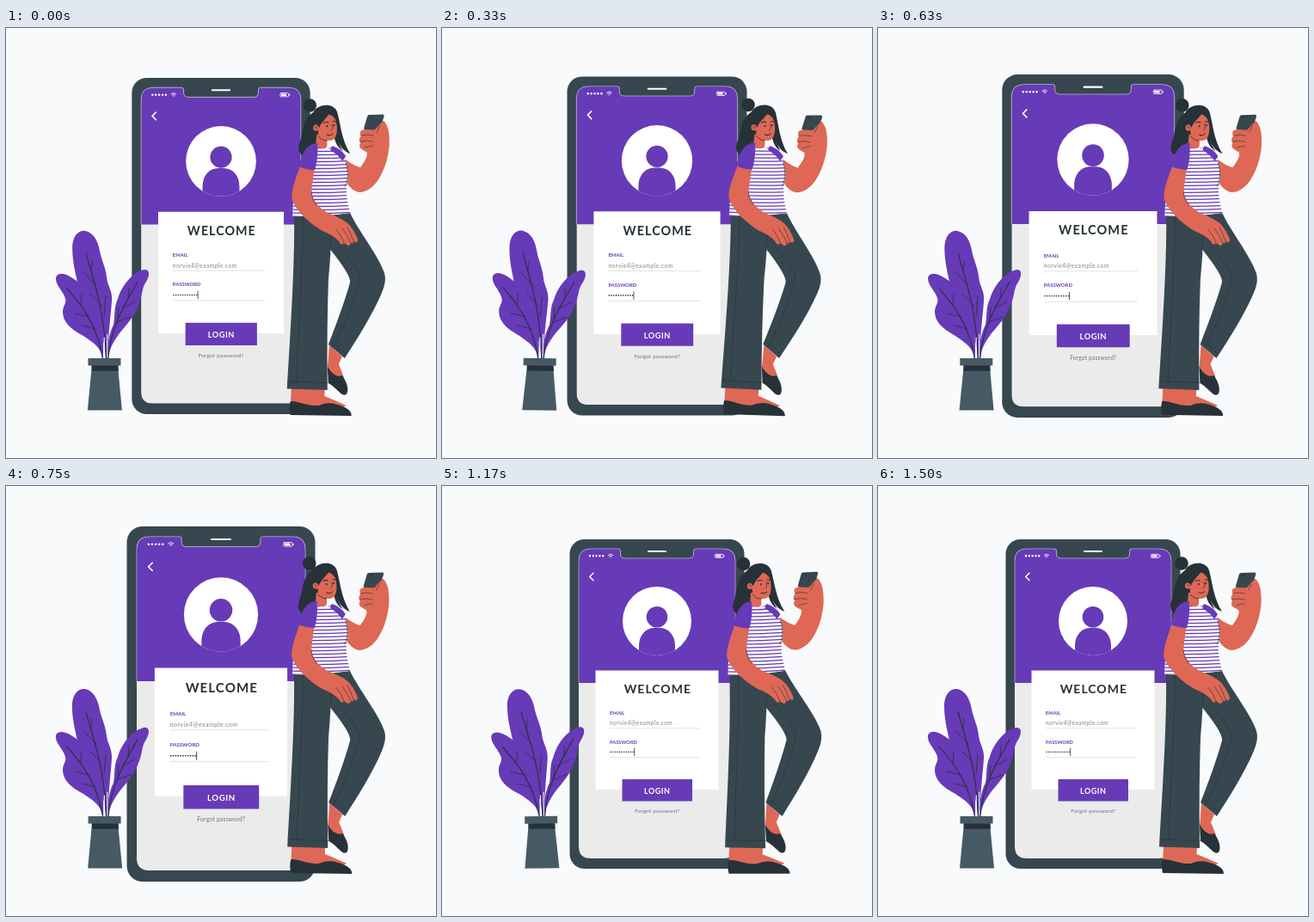
Recreate the animation shown at these times as an HTML page. Size 500 px wide and 500 px high, loop 1540 ms.

```html
<!DOCTYPE html>
<html lang="en">
<head>
<meta charset="utf-8">
<title>Login</title>
<style>
  html, body { margin: 0; width: 100%; height: 100%; overflow: hidden; background: #f8fafc; }
  svg { display: block; width: 100vw; height: 100vh; }
  text { font-family: Lato, sans-serif; }
  .purple { fill: #673ab7; }
  .slate { fill: #37474f; }
  .dark { fill: #263238; }
  .skin { fill: #de6855; }
  .pot { fill: #455a64; }
  .line { fill: none; stroke: #263238; stroke-linecap: round; stroke-linejoin: round; }
  .white { fill: none; stroke: #fff; stroke-linecap: round; stroke-linejoin: round; }
  .label { font-size: 5.7px; font-weight: 700; fill: #673ab7; }
  .mid { text-anchor: middle; }
</style>
</head>
<body>
<svg viewBox="0 0 500 500">
  <defs>
    <clipPath id="screen"><path d="M173 73H205Q207.500 73 207.500 76V79Q207.500 84 213 84H287Q292.500 84 292.500 79V76Q292.500 73 295 73H327Q341 73 341 87V419Q341 433 327 433H173Q159 433 159 419V87Q159 73 173 73Z"/></clipPath>
    <clipPath id="avatar"><circle cx="250" cy="157" r="40"/></clipPath>
    <clipPath id="shirt"><path d="M360 135C367 141 374 141 380 138L394 151C397 160 399 172 397 179C394 190 397 202 400 215Q368 220 333 219L334 200L356 180Q355 155 360 135Z"/></clipPath>
  </defs>

  <g id="phone">
    <rect class="slate" x="148.500" y="62" width="203" height="383" rx="17"/>
    <g clip-path="url(#screen)">
      <path fill="#ebebeb" d="M159 73h182v360H159z"/>
      <path class="purple" d="M159 73h182v156H159z"/>
    </g>
    <path class="white" stroke-width=".6" opacity=".7" d="M159 229V87Q159 73 173 73H205Q207.500 73 207.500 76V79Q207.500 84 213 84H287Q292.500 84 292.500 79V76Q292.500 73 295 73H327Q341 73 341 87V229"/>
    <path class="white" stroke-width="2" d="M240 76H260"/>
    <path class="white" stroke-width="2.400" stroke-dasharray="0 3.800" d="M172 81.300H187.500"/>
    <path class="white" stroke-width=".9" d="M193.300 80.300Q196 77.900 198.700 80.300M194.600 81.700Q196 80.500 197.400 81.700M196 83V83.100"/>
    <rect class="white" stroke-width=".8" x="317.500" y="79.300" width="9.500" height="4.200" rx="1"/>
    <path fill="#fff" d="M318.500 80.200h6v2.400h-6zM327.500 80.500h1v1.800h-1z"/>
    <path class="white" stroke-width="1.500" d="M176 101.200L171.700 105.500L176 109.800"/>

    <circle cx="250" cy="157" r="40" fill="#fff"/>
    <circle class="purple" cx="250" cy="152.300" r="12.300"/>
    <path class="purple" clip-path="url(#avatar)" d="M229 200V186C229 173 237 165 247 165H253C263 165 271 173 271 186V200Z"/>

    <path fill="#fff" d="M178.500 214.500h143v138.500h-143z"/>
    <text class="dark mid" x="250.800" y="241" font-size="14" font-weight="700" letter-spacing="1">WELCOME</text>
    <text class="label" x="195" y="266">EMAIL</text>
    <text x="195" y="278.300" font-size="6.600" letter-spacing=".4" fill="#858585">norvie4@example.com</text>
    <text class="label" x="195" y="299.500">PASSWORD</text>
    <path class="line" stroke="#455a64" stroke-width="1.600" stroke-dasharray="0 2.650" d="M196 309.300H222.800"/>
    <path class="line" stroke-width=".8" d="M223.700 305V313.500"/>
    <path fill="none" stroke="#dcdcdc" stroke-width=".8" d="M195 281.600H300M195 315.600H300"/>
    <path class="purple" d="M209.500 341h81.500v25.500h-81.500z"/>
    <text class="mid" x="250.300" y="357.500" font-size="9" font-weight="700" letter-spacing=".5" fill="#fff">LOGIN</text>
    <text class="mid" x="250.200" y="380.300" font-size="6.300" letter-spacing=".2" fill="#707070">Forgot password?</text>
  </g>

  <g id="plant">
    <g class="purple">
      <path d="M112 384C111 372 102 366 90 358C75 350 66 342 66 330C66 322 72 320 68 312C64 303 57 298 58 290C60 284 68 285 76 290C92 299 103 318 108 330C112 345 114 365 113 384Z"/>
      <path d="M116 384C115 368 112 356 107 348C98 338 90 322 85 305C83 293 77 275 77 256C77 242 84 235 92 236C102 238 107 248 109 260C111 270 116 279 117 290C118 300 124 306 123 317C122 333 119 355 118 384Z"/>
      <path d="M118 384C117 370 120 355 125 345C127 335 125 325 130 315C135 298 148 284 160 281C168 280 167 288 163 295C157 303 159 312 154 322C150 335 140 345 132 355C124 366 120 374 119 384Z"/>
    </g>
    <g class="line" stroke-width="1.100">
      <path d="M93 262C100 290 114 322 116.500 384M71 303C86 320 106 344 112.500 384M153 295C141 316 121 348 119 384"/>
      <path stroke-width=".8" d="M99 282L100 271M105 300L91 285M112 323L98 309M114 335L116 312M87 322L88 309M97 336L80 332M104 350L88 346M142 313L143 302M135 326L150 318M128 342L145 336M130 338L131 325"/>
    </g>
    <path class="white" stroke-width="1" d="M114.300 360V383M117.800 356V383"/>
    <path class="pot" d="M100 392h30l5 52.500H95z"/>
    <path class="dark" d="M99.500 392h31l.5 6.700h-31z"/>
    <path class="pot" d="M95.500 384h38v8.500h-38z"/>
  </g>

  <g id="woman">
    <!-- far leg and foot -->
    <path class="skin" d="M376 369L391 382L387 391Q390 398 393 406L384 408L374 396Z"/>
    <path class="dark" d="M374 393.500C378 401 385 407 391 404C395 409 399 418 397 424Q396 428 391 426C386 422 381 416 375 413Z"/>
    <path class="slate" d="M362 219L400 215C410 236 434 266 440 285Q443 294 437 308C425 336 408 362 394 384L375 368C384 345 394 318 400 296Q402 288 375 255Z"/>
    <path class="line" stroke-width=".6" d="M386 252C400 270 412 283 411 293C405 318 392 350 380 372M378 364L396 379"/>
    <!-- near leg and foot -->
    <path class="skin" d="M332 418H371L370.500 428Q383 433 396 439L380 446L331 440Z"/>
    <path class="dark" d="M331 434C342 434 350 440 364 439C376 434 383 437 392 440Q402 444 402 451L331 450Q329 442 331 434Z"/>
    <path class="slate" d="M335 218L379 217Q378 260 375 292Q373 350 374 421L327 419.500C330 365 336 280 335 218Z"/>
    <path class="line" stroke-width=".6" d="M328 411L374 412.500M345 220C346 270 340 345 338 411M376 255Q379 247 378 234"/>

    <!-- raised arm -->
    <path class="skin" d="M391 150C399 156 406 161 412 162C418 154 421 148 419 144C412 141 409 138 412 134C410 131 410 127 413 126C410 122 412 118 417 118L431 114C434 109 438 106 440 109C445 115 446 125 445.500 137C444 153 439 168 431 179C424 188 414 193 407 190C401 187 397 182 395 178Z"/>
    <path class="slate" d="M422 101L438 100.500Q440 101 439.300 103L434.500 117Q434 118.500 432 118.500L417 118Q415.500 117.500 416 116L420 102.500Q420.500 101 422 101Z"/>
    <path class="line" stroke-width="1.200" d="M423 103.500H426"/>
    <path class="skin" d="M412 124C412 121 416 119 422 121Q429 120 433 113L438 109L441 127L432 134L414 132Z"/>
    <path class="line" stroke="#9f3f35" stroke-width=".6" d="M413 125Q420 123 427 125M412 132Q419 130 426 132M417 139Q423 137 426 137M431 121Q434 116 434 113"/>

    <!-- hair behind -->
    <circle class="dark" cx="353" cy="90" r="7.800"/>
    <path class="dark" d="M357 98C362 88 381 86 385 98C389 113 390 130 400 146C394 144 389 139 386 132C389 139 391 142 392 143C386 140 382 133 381 124L362 130C359 140 353 148 346 149C340 146 338 139 342 131C346 119 344 107 357 98Z"/>
    <path class="skin" d="M361 124H373L373 137Q368 145 360 136Z"/>

    <g clip-path="url(#shirt)">
      <path fill="#fafafa" d="M330 130h75v92h-75z"/>
      <path id="stripes" class="line" style="stroke:#673ab7" stroke-width="1.300"/>
    </g>
    <path class="line" stroke-width=".7" d="M395 156C399 170 397 179 394 184"/>
    <path class="purple" d="M379 137Q389 140 395 149L391 155Q388 149 377 142Z"/>
    <path class="skin" d="M360 134L373 132V138Q368 143 360 137Z"/>

    <!-- face -->
    <path class="skin" d="M362 107C366 99 379 97 383 107C386 116 385 127 380 130C374 133 366 129 363 124Z"/>
    <circle class="skin" cx="360.500" cy="116" r="3.600"/>
    <path class="dark" d="M358 101C364 91 378 88 384 99L385 108Q380 103 376 99C372 106 366 109 364 116L361 112Z"/>
    <path class="line" stroke-width="1" d="M369 110.500Q372 108.500 374.500 110M380 109Q382 108 383.500 109.500M373 124Q377 126 379.500 123"/>
    <path class="line" stroke-width=".7" d="M379 112Q381 117 378 119M359 115Q361 114 361.500 117"/>
    <path class="line" stroke-width="2" d="M373 114V114.200M381.300 113V113.200"/>
    <path class="line" stroke="#a8453a" stroke-width=".8" d="M363 126Q367 131 373 131"/>

    <!-- resting arm -->
    <path class="skin" d="M342 160C336 177 331 190 332.500 199C336 211 351 226 368 236C378 240 386 245 389 251Q391 253 393 250L396 252Q399 255 401 250Q404 251 404 248Q409 251 409 246C406 238 402 231 396 226C388 220 377 217 371 213C361 207 356 198 355 190L359 160Z"/>
    <path class="line" stroke="#9f3f35" stroke-width=".6" d="M384 234Q390 241 393 250M391 233Q397 241 401 250M397 232Q401 239 404 248M355 190Q355 199 361 206"/>
    <path class="purple" d="M362 134C352 134 347 141 344 149L340 161Q349 165 359 165Q363 152 362 134Z"/>
  </g>
</svg>
<script>
const LOOP = 1540, CYCLE = 1500, LEAD = 31;
const byId = id => document.getElementById(id);

// Piecewise linear value from [time, value] pairs
function track(keys, time) {
  const i = keys.findIndex(([end]) => time <= end);
  if (i <= 0) return keys[0][1];
  const [[t0, v0], [t1, v1]] = [keys[i - 1], keys[i]];
  return v0 + (v1 - v0) * (time - t0) / (t1 - t0);
}

const beat = [[0, 1], [150, 1.1], [450, 1], [600, 1], [750, 1.1], [900, 1], [CYCLE, 1]];
const sway = [[0, 0], [375, 1], [1125, -1], [CYCLE, 0]];

let stripes = "";
for (let y = 139; y < 222; y += 4) stripes += `M330 ${y}Q368 ${y + 1.5} 405 ${y - 1}`;
byId("stripes").setAttribute("d", stripes);

const start = performance.now();
function draw(now) {
  const time = Math.min(Math.max(0, now - start) % LOOP + LEAD, CYCLE);
  const scale = track(beat, time), angle = track(sway, time);
  byId("phone").setAttribute("transform", `translate(250 253.5) scale(${scale}) translate(-250 -253.5)`);
  byId("plant").setAttribute("transform", `rotate(${angle} 112 340)`);
  byId("woman").setAttribute("transform", `rotate(${angle} 387 267)`);
  requestAnimationFrame(draw);
}
draw(start);
</script>
</body>
</html>
```
